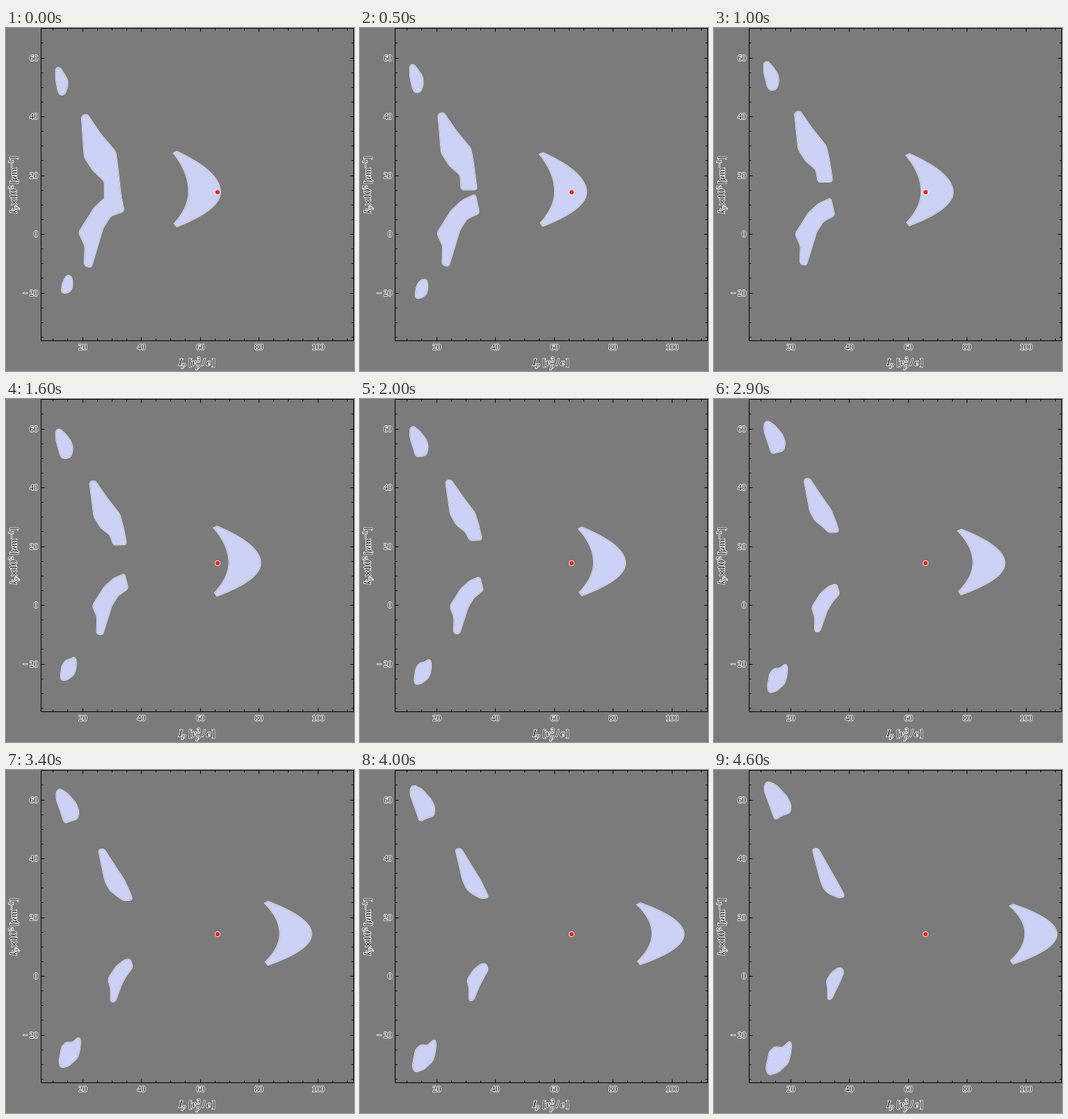
Write a matplotlib script that moves like this. It is 500 px wide and 493 px high and loops after 4.7 s.

```python
import numpy as np
import matplotlib.pyplot as plt
from matplotlib.animation import FuncAnimation
from matplotlib.patches import Polygon, Circle
from matplotlib.patheffects import withStroke

W, H, DPI = 500, 493, 64
PT = 72 / DPI                      # points per pixel
STEPS, STEP_MS = 47, 100
GRAY, FILL, RIM, RED = "#7b7b7b", "#ccd2f6", "#a0a4c0", "#ee2412"
LEFT, RIGHT, TOP, BOTTOM = 50.5, 499.5, 0.5, 449.5
BLANK_STEP = 10                    # the lowest region drops out once

plt.rcParams.update({"font.family": "Liberation Serif", "mathtext.fontset": "stix"})


def soften(pts, reach=2):
    """Cut every corner, at most `reach` pixels from it."""
    for _ in range(2):
        edge = np.roll(pts, -1, axis=0) - pts
        size = np.hypot(*edge.T)[:, None] + 1e-9
        cut = edge * np.minimum(0.25, reach / size)
        pts = np.stack([pts + cut, pts + edge - cut], axis=1).reshape(-1, 2)
        reach /= 3
    return pts


def morph(first, last, power=1):
    """Outline that drifts evenly in x and eases out in y."""
    a, b = np.array(first, float), np.array(last, float)

    def shape(step):
        u = step / (STEPS - 1)
        return soften(a + (b - a) * [u, 1 - (1 - u) ** power])
    return shape


def arc(tip, apex):
    """Half parabola from a tip to the apex."""
    s = np.linspace(1, 0, 14)[:, None]
    return apex + (np.array(tip) - apex) * np.hstack([s**2, s])


def crescent(step):
    right = 307.5 + 3.4 * step + 0.0133 * step**2
    top, low = 178 + 0.34 * step, 285 - 0.15 * step
    outer, inner = np.array([right, 236]), np.array([right - 44.5, 235])
    return np.vstack([
        arc((right - 62, top), outer), arc((right - 62, low), outer)[::-1],
        arc((right - 65, low - 4), inner), arc((right - 66, top + 2), inner)[::-1],
    ])


upper_blob = morph(
    [(72, 58), (77, 57), (83, 66), (88, 75), (88, 84), (84, 95), (78, 96), (75, 90), (72, 74)],
    [(73, 22), (77, 17), (89, 22), (104, 38), (110, 50), (109, 61), (97, 65), (88, 71), (73, 30)],
)
upper_lobe = morph(
    [(109, 127), (116, 124), (135, 152), (157, 178), (160, 200),
     (165, 245), (142, 245), (142, 220), (125, 204), (113, 185)],
    [(142, 114), (149, 113), (161, 134), (174, 157), (184, 175),
     (187, 182), (179, 183), (165, 177), (158, 170), (153, 157)],
    power=2,
)
lower_lobe = morph(
    [(163, 234), (169, 263), (150, 270), (139, 287), (122, 344),
     (113, 341), (114, 313), (105, 294), (127, 259), (143, 244)],
    [(183, 285), (186, 290), (180, 305), (175, 315), (169, 328),
     (164, 330), (164, 314), (162, 303), (169, 292), (178, 285)],
)
lower_blob = morph(
    [(82, 366), (85, 360), (88, 356), (93, 357), (95, 363),
     (95, 373), (91, 379), (84, 381), (80, 379), (81, 372)],
    [(80, 405), (88, 398), (98, 400), (109, 390), (111, 396),
     (109, 410), (106, 421), (92, 434), (79, 438), (75, 430)],
    power=1.3,
)

fig = plt.figure(figsize=(W / DPI, H / DPI), dpi=DPI, facecolor=GRAY)
ax = fig.add_axes([0, 0, 1, 1])
ax.set(xlim=(0, W), ylim=(H, 0))
ax.axis("off")


def region():
    """Outline layers lie below all fills, so touching regions merge."""
    layers = [("white", 2.4, 1), (RIM, 1, 2), (FILL, 0, 3)]
    return [ax.add_patch(Polygon([(0, 0)] * 3, fc=c, ec=c, lw=w * PT, zorder=z))
            for c, w, z in layers]


def label(x, y, text, size=12, **kw):
    kw = {"ha": "center", "va": "center", **kw}
    ax.text(x, y, text, size=size * PT, color="black",
            path_effects=[withStroke(linewidth=1.8 * PT, foreground="white")], **kw)


def line(x0, y0, x1, y1):
    ax.plot([x0, x1], [y0, y1], color="black", lw=PT, zorder=6, snap=False,
            solid_capstyle="butt")


def px(v):
    return np.floor(110 + (v - 20) * 4.225) + 0.5


def py(v):
    return np.floor(296.5 - v * 4.225) + 0.5


def tick_len(v):
    return 5 if v % 20 == 0 else 3


for x in (LEFT, RIGHT):
    line(x, TOP, x, BOTTOM)
for y in (TOP, BOTTOM):
    line(LEFT, y, RIGHT, y)

for v in range(10, 111, 5):
    line(px(v), BOTTOM, px(v), BOTTOM - tick_len(v))
    line(px(v), TOP, px(v), TOP + tick_len(v))
for v in range(-35, 70, 5):
    line(LEFT, py(v), LEFT + tick_len(v), py(v))
    line(RIGHT, py(v), RIGHT - tick_len(v), py(v))

for v in range(20, 101, 20):
    label(px(v), 459.5, str(v))
for v in range(-20, 61, 20):
    label(46, py(v) + 0.5, str(v).replace("-", "\u2212 "), ha="right")

label(275, 482, r"$I_p\,\,[v_p^3\,/\,e\,]$", 14.5)
label(11, 225, r"$k_y\!\times\!10^2\,[\mu\mathrm{m}^{-1}]$", 14, rotation=90)
ax.add_patch(Circle((304, 236), 3.6, fc=RED, ec="white", lw=0.8 * PT, zorder=7))

shapes = [upper_blob, upper_lobe, lower_lobe, crescent, lower_blob]
regions = [region() for _ in shapes]


def update(step):
    for shape, layers in zip(shapes, regions):
        outline = shape(step)
        for layer in layers:
            layer.set_xy(outline)
    for layer in regions[-1]:
        layer.set_visible(step != BLANK_STEP)
    return []


anim = FuncAnimation(fig, update, frames=STEPS, interval=STEP_MS, repeat=True,
                     repeat_delay=0, blit=False)
plt.show()
```
